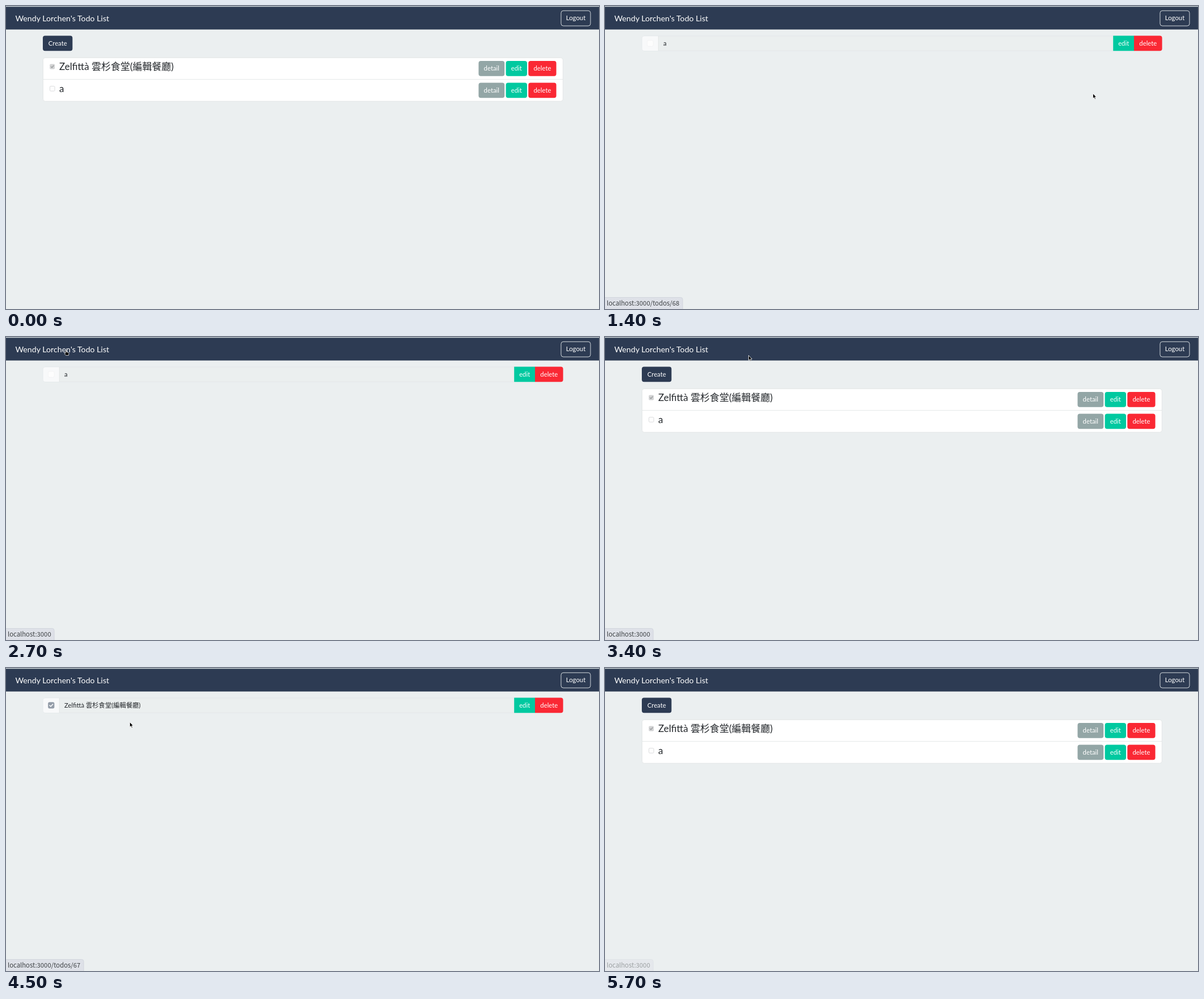
An HTML page that plays this animation: 1047 px wide and 535 px high, repeating every 5.8 s.

```html
<!DOCTYPE html>
<html lang="en">
<head>
<meta charset="utf-8">
<title>Todo List</title>
<style>
  html, body { margin: 0; width: 100%; height: 100%; overflow: hidden; background: #ebeff0; }
  svg { display: block; width: 1047px; height: 535px; }
  text { font: 11.34px Lato, "Noto Sans CJK TC", "Noto Sans CJK", sans-serif; fill: #212529; }
  .brand { font-size: 14.18px; fill: #fff; }
  .title { font-size: 17px; }
  .btn text { fill: #fff; text-anchor: middle; }
  .url { font: 11.3px "Noto Sans CJK TC", "Noto Sans CJK", "Noto Sans", sans-serif; fill: #3c4043; }
  .line { fill: none; stroke: #dfe3e4; stroke-width: .8; }
  .box { fill: #fdfdfd; stroke: #d3d5d6; stroke-width: .8; }
  .tick { fill: none; stroke-linecap: round; stroke-linejoin: round; }
  .cursor { fill: #000; stroke: #fff; stroke-width: .8; stroke-linejoin: round; }
</style>
</head>
<body>
<svg viewBox="0 0 1047 535">
  <rect width="1047" height="535" fill="#ebeff0"/>
  <rect width="1047" height="1.5" fill="#d3dade"/>
  <rect y="1.3" width="1047" height="40.2" fill="#2d3b53"/>
  <text class="brand" x="16.5" y="26.5">Wendy Lorchen's Todo List</text>
  <g id="nav"></g>

  <g id="list">
    <rect x="65.4" y="91.4" width="918" height="76.8" rx="4" fill="#fff" stroke="#dfe2e3" stroke-width=".8"/>
    <path class="line" d="M65.4 129.5H983.4"/>
    <rect x="77.3" y="102.6" width="8.8" height="8.8" rx="1.6" fill="#d2d3d4"/>
    <path class="tick" stroke="#8f9294" stroke-width="1.1" d="M79.5 107.2l1.6 1.6 3-3.6"/>
    <rect class="box" x="77.5" y="141.6" width="8.6" height="8.6" rx="1.6"/>
    <text class="title" x="94" y="113">Zelfittà 雲杉食堂(編輯餐廳)</text>
    <text class="title" x="94" y="152">a</text>
  </g>

  <g id="detail">
    <rect x="65.4" y="52.9" width="918" height="26.2" rx="4" fill="#ebefef" stroke="#e0e4e6" stroke-width=".8"/>
    <path d="M94.2 53.2H69.5a4 4 0 0 0-4 4V75a4 4 0 0 0 4 4H94.2z" fill="#f8f9fa"/>
    <path class="line" d="M94.3 53V79"/>
    <rect id="empty" x="74.6" y="60.6" width="10.6" height="10.6" rx="2.4" fill="#fdfdfd" stroke="#f1f2f3" stroke-width=".8"/>
    <g id="checked">
      <rect x="74.2" y="60.2" width="11.2" height="11.2" rx="2.6" fill="#939ca8"/>
      <path class="tick" stroke="#fff" stroke-width="1.5" d="M77 66l2 2 3.7-4"/>
    </g>
    <text id="name" x="103" y="69.6"></text>
  </g>

  <g id="status">
    <path id="bubble" fill="#dee1e8" stroke="#cdd2da" stroke-width=".8"/>
    <text class="url" id="url" x="3" y="529"></text>
  </g>

  <path id="arrow" class="cursor" d="M.5.5V9.2L2.5 7.4 3.9 10.6 5.4 9.9 4 6.9H6.6z"/>
  <path id="hand" class="cursor" d="M2.4 6V1.3a.9.9 0 0 1 1.8 0V3.6L7.6 4.2Q8.8 4.5 8.6 6L8 9.4H3.2L.8 6.6Q.4 5.4 1.4 5.4z"/>
</svg>
<script>
const LOOP = 5800;
const GREY = '#93a6a6', GREY_HOVER = '#758484', GREEN = '#00c9a0', RED = '#fa2834', NAVY = '#2d3b53';
const el = id => document.getElementById(id);

function make(parent, tag, attrs) {
  const node = document.createElementNS('http://www.w3.org/2000/svg', tag);
  for (const key in attrs) node.setAttribute(key, attrs[key]);
  return parent.appendChild(node);
}

// corners: 'all', 'right' or 'none'
function button(parent, label, x, y, w, fill, corners = 'all') {
  const g = make(parent, 'g', { class: 'btn' }), h = 26.8;
  const d = corners === 'all'
    ? `M${x + 4} ${y}h${w - 8}a4 4 0 0 1 4 4v${h - 8}a4 4 0 0 1-4 4h${8 - w}a4 4 0 0 1-4-4v${8 - h}a4 4 0 0 1 4-4z`
    : corners === 'right'
      ? `M${x} ${y}h${w - 4}a4 4 0 0 1 4 4v${h - 8}a4 4 0 0 1-4 4h${4 - w}z`
      : `M${x} ${y}h${w}v${h}h${-w}z`;
  const shape = make(g, 'path', { d, fill });
  make(g, 'text', { x: x + w / 2, y: y + 17.1 }).textContent = label;
  return shape;
}

const logout = button(el('nav'), 'Logout', 980, 8.3, 52, 'none');
logout.setAttribute('stroke', '#e6eaec');
logout.setAttribute('stroke-width', '.9');
button(el('list'), 'Create', 65, 52.5, 52.4, NAVY);
const details = [96.9, 135.4].map(y => {
  button(el('list'), 'edit', 882.6, y, 37.4, GREEN);
  button(el('list'), 'delete', 922.3, y, 49.3, RED);
  return button(el('list'), 'detail', 834.4, y, 45.8, GREY);
});
button(el('detail'), 'edit', 897.2, 52.5, 37, GREEN, 'none');
button(el('detail'), 'delete', 934, 52.5, 49.6, RED, 'right');

// Each track holds its value until the next entry; the time comes first.
const cursorTrack = [
  [0], [400, 'arrow', 407, 36], [500, 'arrow', 440, 130], [600, 'arrow', 525, 204],
  [700, 'arrow', 650, 227], [800, 'arrow', 775, 204], [900, 'arrow', 857, 164],
  [1000, 'hand', 858, 152], [1400, 'arrow', 861, 154],
  [1600, 'arrow', 858, 151], [1700, 'arrow', 851, 146], [1800, 'arrow', 840, 139],
  [1900, 'arrow', 825, 131], [2000, 'arrow', 807, 123], [2100, 'arrow', 787, 116],
  [2200, 'arrow', 570, 92], [2300, 'arrow', 290, 54], [2400, 'arrow', 107, 25],
  [2700, 'hand', 102.5, 23], [3400, 'arrow', 253, 32], [3700, 'arrow', 728, 78],
  [3900, 'arrow', 812, 97], [4000, 'hand', 864, 107], [4300, 'arrow', 812, 103],
  [4500, 'arrow', 218, 95], [4800, 'arrow', 141, 42], [5000, 'hand', 132, 30],
  [5300, 'arrow', 85, 3], [5500, 'arrow', 58, -2], [5700]
];
const pageTrack = [[0, ''], [1300, 'a'], [3400, ''], [4500, 'Zelfittà 雲杉食堂(編輯餐廳)'], [5300, '']];
const hoverTrack = [[0, -1], [1000, 1], [3400, -1], [4000, 0], [4500, -1]];
const statusTrack = [
  [0, '', 0], [1000, '/todos/68', 1], [1700, '/todos/68', .45], [1800, '', 0],
  [2700, '', 1], [4000, '/todos/67', 1], [4800, '', 0], [5300, '', 1], [5700, '', .45]
];

const at = (track, t) => track.findLast(entry => entry[0] <= t).slice(1);
const show = (id, on) => { el(id).style.display = on ? '' : 'none'; };

function draw() {
  const t = performance.now() % LOOP;
  const [kind, x, y] = at(cursorTrack, t);
  for (const id of ['arrow', 'hand']) {
    show(id, id === kind);
    if (id === kind) el(id).setAttribute('transform', `translate(${x} ${y})`);
  }

  const [name] = at(pageTrack, t);
  show('list', !name);
  show('detail', name);
  show('empty', name === 'a');
  show('checked', name !== 'a');
  el('name').textContent = name;

  const [row] = at(hoverTrack, t);
  details.forEach((shape, i) => shape.setAttribute('fill', i === row ? GREY_HOVER : GREY));

  const [path, alpha] = at(statusTrack, t);
  el('status').setAttribute('opacity', alpha);
  el('url').textContent = 'localhost:3000' + path;
  el('bubble').setAttribute('d', `M-2 514.6H${path ? 133.6 : 81.6}a3.5 3.5 0 0 1 3.5 3.5V537H-2z`);

  requestAnimationFrame(draw);
}
draw();
</script>
</body>
</html>
```
